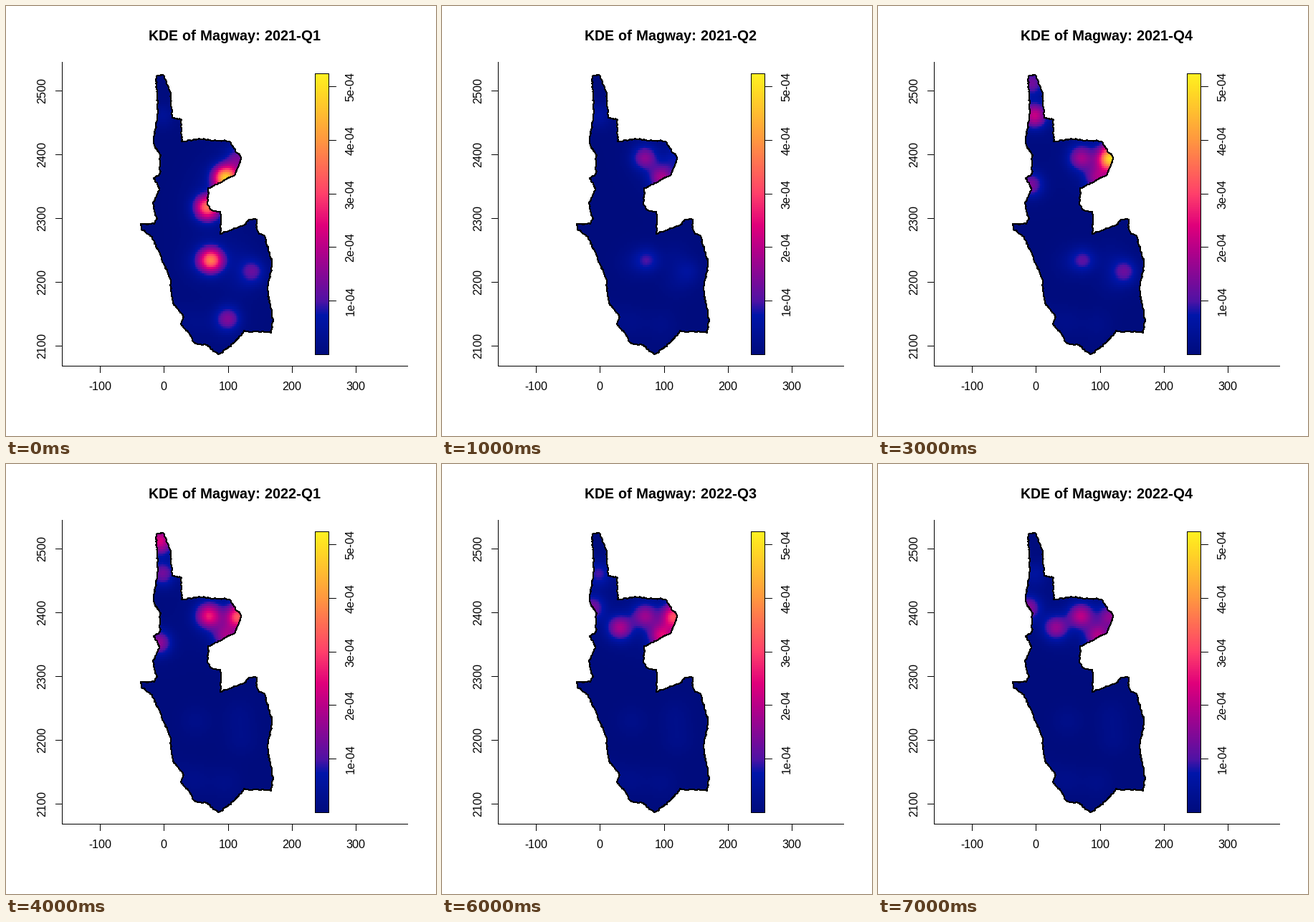
Animation, 600 px wide and 600 px high, one loop 8 s. Source, as a matplotlib script:

```python
import numpy as np
import matplotlib.pyplot as plt
from matplotlib.animation import FuncAnimation
from matplotlib.colors import LinearSegmentedColormap
from matplotlib.patches import Polygon, Rectangle

PX = 0.72  # points per pixel at 100 dpi
plt.rcParams.update({
    "font.family": "Liberation Sans",
    "text.hinting": "native",
    "text.hinting_factor": 1,
})

QUARTERS = [f"{year}-Q{q}" for year in (2021, 2022) for q in (1, 2, 3, 4)]
TOP_DENSITY = 5.24  # colour bar maximum, in units of 1e-04
BANDWIDTH = 12
LEFT, RIGHT, TOP, BOTTOM = 187, 373, 94, 487

# Main corners of the region, clockwise from the northern tip
CORNERS = np.array([
    (209, 97), (219, 96), (229, 120), (231, 155), (244, 158), (245, 189),
    (267, 185), (311, 188), (328, 213), (318, 235), (288, 251), (282, 254),
    (281, 276), (286, 284), (299, 287), (299, 317), (333, 305), (339, 297),
    (349, 297), (350, 314), (361, 322), (371, 359), (364, 395), (372, 438),
    (369, 455), (332, 453), (316, 471), (296, 486), (278, 472), (263, 471),
    (254, 455), (243, 444), (247, 433), (232, 412), (228, 378), (203, 321),
    (188, 311), (188, 304), (206, 303), (210, 297), (204, 275), (214, 255),
    (206, 240), (214, 235), (215, 207), (205, 192), (211, 150),
], float)

SITES = dict(
    tip=(214, 106), neck=(218, 152), cliff=(209, 200), gorge=(213, 249),
    west=(248, 228), north=(283, 211), east=(325, 212), rim=(307, 240),
    bay=(281, 281), centre=(286, 355), plain=(345, 371), south=(310, 437),
)

# Peak density of the active sites; a missing quarter is the mean of its neighbours
PEAKS = {
    "2021-Q1": dict(neck=.4, east=1.1, rim=4.4, bay=3.3, centre=3.4, plain=1, south=1.2),
    "2021-Q2": dict(neck=.5, north=1.4, east=.6, rim=1.7, centre=.85, plain=.4),
    "2021-Q4": dict(tip=1.2, neck=2, gorge=1.3, north=1.55, east=4.6, rim=1.5,
                    centre=.95, plain=1.05),
    "2022-Q1": dict(tip=2.2, neck=1.2, gorge=1.5, north=2.4, east=3, rim=1.5),
    "2022-Q2": dict(neck=1.3, cliff=1.1, west=1.9, north=1.1, east=4.4, rim=2.6),
    "2022-Q4": dict(neck=.5, cliff=1.4, west=1.5, north=1.8, east=1.4, rim=1.7),
}

CMAP = LinearSegmentedColormap.from_list("bmy", [
    (0, "#000c7d"), (.14, "#0016aa"), (.19, "#4f13a5"), (.25, "#730c9b"),
    (.383, "#b90088"), (.46, "#e0007b"), (.571, "#ff3f6b"), (.763, "#ff9740"),
    (.954, "#ffe122"), (1, "#fff123"),
], N=256)


def rough_border():
    """Subdivide the sides and jitter them into a ragged edge."""
    rng = np.random.default_rng(4)
    points = []
    for a, b in zip(CORNERS, np.roll(CORNERS, -1, axis=0)):
        steps = max(1, int(np.hypot(*(b - a)) / 2.2))
        t = np.arange(steps)[:, None] / steps
        points.append(a + (b - a) * t + rng.uniform(-.9, .9, (steps, 2)))
    return np.vstack(points) + .5


def bump(x, y, height, width):
    return height * np.exp(-((GX - x) ** 2 + (GY - y) ** 2) / (2 * width ** 2))


def density(quarter):
    if quarter not in PEAKS:
        i = QUARTERS.index(quarter)
        return (density(QUARTERS[i - 1]) + density(QUARTERS[i + 1])) / 2
    total = HAZE.copy()
    for site, peak in PEAKS[quarter].items():
        total += bump(*SITES[site], peak, BANDWIDTH)
        total += bump(*SITES[site], .06 * peak, 2.5 * BANDWIDTH)
    return total


def line(xs, ys):
    ax.plot(np.array(xs) + .5, np.array(ys) + .5, color="black", lw=PX,
            antialiased=False, snap=False, solid_capstyle="projecting")


def label(x, y, text, angle=0):
    ax.text(x, y, text, fontsize=16 * PX, rotation=angle, ha="center", va="center")


GX, GY = np.meshgrid(np.linspace(LEFT, RIGHT, 128), np.linspace(TOP, BOTTOM, 128))
glow = np.random.default_rng(7)
HAZE = sum(bump(glow.uniform(225, 355), glow.uniform(320, 460), .2, 16)
           for _ in range(6))
MAPS = [density(q) for q in QUARTERS]

fig = plt.figure(figsize=(6, 6), dpi=100, facecolor="white")
ax = fig.add_axes([0, 0, 1, 1])
ax.axis("off")

# Density map
heat = ax.imshow(MAPS[0], cmap=CMAP, vmin=0, vmax=TOP_DENSITY,
                 extent=(LEFT, RIGHT, BOTTOM, TOP), interpolation="nearest",
                 aspect="auto")
outline = Polygon(rough_border(), closed=True, fill=False, ec="black", lw=PX,
                  antialiased=False, snap=False, joinstyle="round", zorder=3)
ax.add_patch(outline)
heat.set_clip_path(outline)

# Colour bar
ax.imshow(np.linspace(1, 0, 256)[:, None], cmap=CMAP, vmin=0, vmax=1,
          extent=(431, 451, 487, 94), interpolation="nearest", aspect="auto")
ax.add_patch(Rectangle((431.5, 94.5), 19, 392, fill=False, ec="black", lw=PX,
                       antialiased=False, snap=False, zorder=3))

# Axes
line((78, 78), (78, 502))
line((78, 560), (502, 502))
for k in range(5):
    x = round(131.3 + 89.2 * k)
    y = round(474.4 - 89.1 * k)
    bar_y = round(411.3 - 74.8 * k)
    line((x, x), (502, 511))
    line((69, 78), (y, y))
    line((450, 460), (bar_y, bar_y))
    label(x, 532, str(100 * k - 100))
    label(50.5, y, str(2100 + 100 * k), 90)
    label(481, bar_y + .5, f"{k + 1}e-04", 90)

title = ax.text(319, 48, "", fontsize=20 * PX, weight="bold", ha="center",
                va="baseline")
ax.set_xlim(0, 600)
ax.set_ylim(600, 0)


def update(i):
    heat.set_data(MAPS[i])
    title.set_text(f"KDE of Magway: {QUARTERS[i]}")
    return heat, title


anim = FuncAnimation(fig, update, frames=len(QUARTERS), interval=1000,
                     repeat=True, repeat_delay=0)
plt.show()
```
